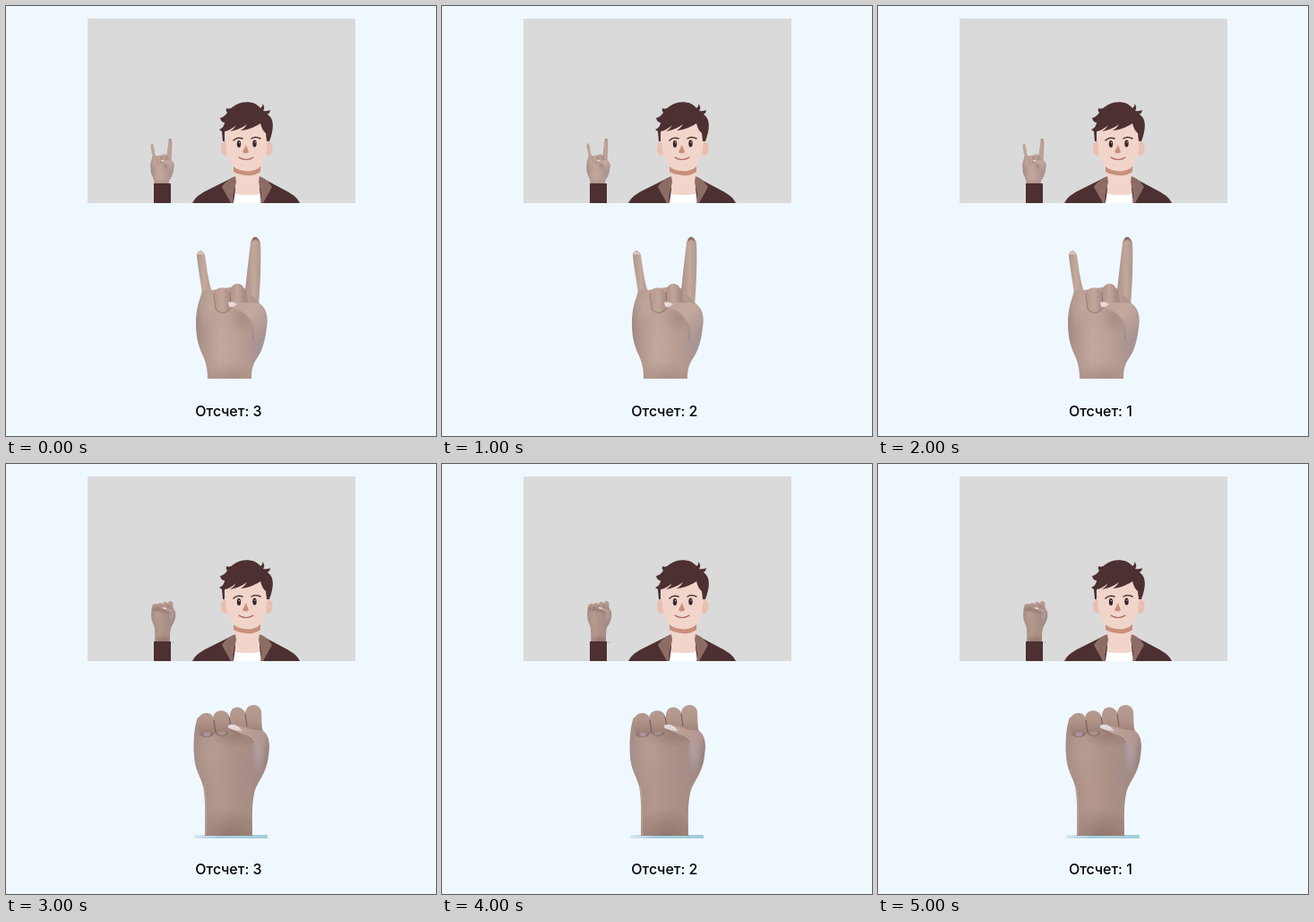
Animation, 480 px wide and 480 px high, one loop 6 s. Source, as an HTML page with a canvas:

```html
<!DOCTYPE html>
<html lang="ru">
<head>
<meta charset="utf-8">
<title>Отсчет</title>
<style>
html, body { margin: 0; width: 100%; height: 100%; overflow: hidden; background: #f0f8ff; }
canvas { display: block; width: 480px; height: 480px; }
</style>
</head>
<body>
<canvas id="stage" width="480" height="480"></canvas>
<script>
const ctx = document.getElementById('stage').getContext('2d');
const LOOP = 6000;
const STEP = 1000;

const PAGE = '#f0f8ff';
const BROWN = '#4d3031';
const COLLAR = '#8c6c64';
const SKIN = '#f1d5cb';
const SHADOW = '#c88f7c';

const DARK = '104,78,76';
const LIGHT = '222,198,184';
const COOL = '160,147,156';

const fill = (d, color) => {
  ctx.fillStyle = color;
  ctx.fill(new Path2D(d));
};

const line = (d, color, width) => {
  ctx.strokeStyle = color;
  ctx.lineWidth = width;
  ctx.lineCap = ctx.lineJoin = 'round';
  ctx.stroke(new Path2D(d));
};

const box = (x, y, w, h, color) => {
  ctx.fillStyle = color;
  ctx.fillRect(x, y, w, h);
};

const oval = (x, y, rx, ry, color) => {
  ctx.fillStyle = color;
  ctx.beginPath();
  ctx.ellipse(x, y, rx, ry, 0, 0, Math.PI * 2);
  ctx.fill();
};

const ramp = (x0, y0, x1, y1, ...colors) => {
  const g = ctx.createLinearGradient(x0, y0, x1, y1);
  colors.forEach((c, i) => g.addColorStop(i / (colors.length - 1), c));
  return g;
};

// Soft elliptical patch of light or shade
const glow = (x, y, rx, ry, rgb, alpha) => {
  ctx.save();
  ctx.translate(x, y);
  ctx.scale(rx, ry);
  const g = ctx.createRadialGradient(0, 0, 0, 0, 0, 1);
  g.addColorStop(0, `rgba(${rgb},${alpha})`);
  g.addColorStop(1, `rgba(${rgb},0)`);
  ctx.fillStyle = g;
  ctx.fillRect(-1, -1, 2, 2);
  ctx.restore();
};

const clipped = (d, paint) => {
  ctx.save();
  ctx.clip(new Path2D(d));
  paint();
  ctx.restore();
};

function hornHand() {
  const palm = 'M219 318C216 329 212 337 212 354C212 373 216 382 221 393C224 400 225 408 225 416H274C274 407 275 402 279 395C286 385 289 375 291 359C293 347 291 338 283 332L267 315L250 314L231 317Z';
  const pinky = 'M213 279C213 272 220 271 222 278C224 290 225 304 230 319L228 336L217 336L219 321C217 305 214 291 213 279Z';
  const index = 'M273 264C274 256 282 256 284 264C285 283 284 310 282 335L266 332C267 313 270 290 273 264Z';
  fill(pinky, ramp(213, 0, 230, 0, '#ae958c', '#c4a99d', '#b69a8e'));
  fill(index, ramp(268, 0, 285, 0, '#ae938a', '#c2a79b', '#b0968e'));
  fill(palm, ramp(212, 0, 292, 0, '#aa9088', '#bda297', '#b79c91', '#a8928d'));
  clipped(palm, () => {
    glow(226, 334, 15, 28, LIGHT, .25);
    glow(243, 380, 22, 40, LIGHT, .18);
    glow(281, 381, 17, 32, COOL, .5);
    glow(264, 348, 16, 18, DARK, .2);
    glow(250, 419, 34, 22, DARK, .25);
    glow(211, 369, 10, 45, DARK, .15);
  });
  const middle = 'M250 319C251 307 265 308 266 317L268 333C262 338 253 336 250 331Z';
  const ring = 'M232 321C233 313 247 312 249 320L251 337C249 344 237 345 234 338Z';
  fill(middle, ramp(250, 0, 267, 0, '#b09288', '#c1a599', '#a3887f'));
  fill(ring, ramp(232, 0, 251, 0, '#b5998d', '#c3a69a', '#a5897f'));
  line('M250 320C251 326 250 332 252 337M234 338C238 344 246 344 250 338', 'rgba(111,80,73,.5)', 1);
  line('M267 317C268 323 268 326 270 331M232 321L234 338', 'rgba(111,80,73,.4)', 1);
  fill('M248 331C255 330 264 332 276 331C286 331 292 340 291 351C289 363 281 376 276 381C278 367 275 353 267 345C261 340 253 340 249 336Z',
    ramp(250, 332, 290, 366, '#c0a59b', '#c2a89d', '#a99492'));
  line('M251 337C260 339 269 344 273 352C276 358 277 366 276 373', 'rgba(119,92,86,.3)', 1.2);
  fill('M248 331Q253 329 258 333Q253 337 249 335Z', '#e6dcda');
  fill('M214 278C213 273 220 273 221 278Q217 276 214 278Z', '#dcc9c0');
  fill('M275 263C274 256 282 256 282 263Q278 259 275 263Z', '#8e7168');
}

function fistHand() {
  const body = 'M214 283C210 293 209 310 210 326C211 342 217 348 220 360C223 375 222 395 222 415H275C275 396 274 382 277 368C280 354 291 347 293 325C295 313 294 304 287 298L284 290L250 283Z';
  box(210, 414, 82, 4, ramp(210, 0, 292, 0, '#d7e9f3', '#a7cede', '#a9cfe0', '#a2ccdc'));
  fill(body, ramp(209, 0, 294, 0, '#a58b83', '#b3978c', '#a98e83', '#a08a85'));
  clipped(body, () => {
    glow(226, 322, 18, 42, LIGHT, .15);
    glow(268, 346, 15, 42, COOL, .25);
    glow(209, 325, 7, 40, COOL, .6);
    glow(258, 303, 33, 13, DARK, .27);
    glow(250, 418, 40, 34, DARK, .45);
    line('M221 360C224 375 223 395 223 414', 'rgba(205,190,185,.4)', 1.5);
  });
  const finger = d => fill(d, ramp(0, 270, 0, 304, '#b79d93', '#b0948a', '#957971'));
  finger('M267 281C266 266 283 266 285 276L286 303C278 304 270 301 267 295Z');
  finger('M250 283C249 268 264 269 267 278L270 292C264 298 254 296 251 293Z');
  finger('M231 287C230 272 246 273 249 281L249 298C248 306 236 306 234 300Z');
  finger('M213 292C212 276 229 274 232 284L233 300C230 307 218 306 216 301Z');
  line('M232 286L234 300M249 282L251 294M267 279L269 292', 'rgba(80,57,54,.55)', 1.2);
  line('M217 302Q224 307 232 301M235 301Q241 306 248 300', 'rgba(84,60,56,.3)', 1);
  oval(224, 302, 4, 2.5, 'rgba(170,160,172,.7)');
  oval(241, 301, 4, 2.2, 'rgba(178,162,164,.5)');
  fill('M248 292C260 289 272 298 283 297C293 299 294 308 293 322C290 337 281 350 277 356C279 340 282 319 272 307C264 302 254 299 248 294Z',
    ramp(250, 292, 292, 330, '#c2a9a0', '#b49a91', '#a28b87'));
  clipped(body, () => {
    glow(281, 322, 8, 23, '178,164,173', .7);
    glow(294, 326, 7, 30, DARK, .25);
  });
  line('M251 297C261 302 272 302 276 311', 'rgba(94,69,64,.38)', 1.2);
  fill('M248 292Q253 289 259 293L264 298Q253 297 248 294Z', '#e4dadb');
}

function person() {
  // Neck and clothes
  fill('M254 174H284V194L292 220H246L254 196Z', SKIN);
  fill('M254 177C262 186 276 187 284 179V185C277 191 263 190 254 185Z', SHADOW);
  fill('M252 208C257 212 263 210 269 211C275 211 280 211 285 209L288 220H250Z', '#fff');
  fill('M208 220C211 214 215 211 222 207L254 191L256 204L254 220Z', BROWN);
  fill('M328 220C325 214 321 211 314 207L284 191L283 204L285 220Z', BROWN);
  fill('M256 190C250 192 244 197 241 202L251 220H254C252 212 256 203 257 196Z', COLLAR);
  fill('M283 190C289 192 294 197 297 202L287 220H284C287 212 283 203 282 196Z', COLLAR);

  // Head
  oval(244.5, 159, 4.5, 8, '#e9bfb2');
  oval(293, 159, 4.5, 8, '#e9bfb2');
  fill('M246 130H291C293 147 291 164 288 172C284 181 275 184 268 184C258 184 250 178 248 169C245 157 244 143 246 130Z', SKIN);
  fill('M238 138Q244 135 244 130Q240 130 239 125Q244 124 247 119Q245 117 246 114Q250 116 254 112C262 106 277 105 284 114Q287 112 286 109Q290 113 287 117Q291 118 295 116Q295 119 292 121C300 126 299 138 294 151H291L290 142Q286 139 284 131C279 134 273 138 262 139Q267 136 269 132Q261 138 250 140Q255 137 257 133Q250 139 244 140L244 151H242L241 140Z', BROWN);

  // Face
  line('M254 150Q258 146 264 148M274 148Q278 145 284 148', BROWN, 1.5);
  oval(260, 154, 2.2, 4, '#37282c');
  oval(277.5, 153.5, 2.2, 4, '#37282c');
  oval(260.5, 152.5, .5, .8, '#fff');
  oval(278, 152, .5, .8, '#fff');
  fill('M268 155L264 163Q268 166 271 163Z', SHADOW);
  line('M260 169Q268 174 276 169', '#a6594e', 1.1);
}

function smallHand(draw, x, y, sx, sy, fromX, fromY) {
  ctx.save();
  ctx.translate(x, y);
  ctx.scale(sx, sy);
  ctx.translate(-fromX, -fromY);
  draw();
  ctx.restore();
}

function render(time) {
  const fist = time >= LOOP / 2;
  const count = 3 - Math.floor(time / STEP) % 3;
  box(0, 0, 480, 480, PAGE);
  box(91, 14, 299, 206, '#dadada');
  person();
  if (fist) smallHand(fistHand, 162, 153, .32, .315, 209, 269);
  else smallHand(hornHand, 161, 148, .33, .325, 211, 257);
  box(165, 198, 19, 22, BROWN);
  (fist ? fistHand : hornHand)();
  ctx.fillStyle = '#000';
  ctx.font = '500 16px Inter, sans-serif';
  ctx.textAlign = 'center';
  ctx.textBaseline = 'alphabetic';
  ctx.fillText(`Отсчет: ${count}`, 248.4, 458);
}

const start = performance.now();
function tick() {
  render((performance.now() - start) % LOOP);
  requestAnimationFrame(tick);
}
tick();
</script>
</body>
</html>
```
